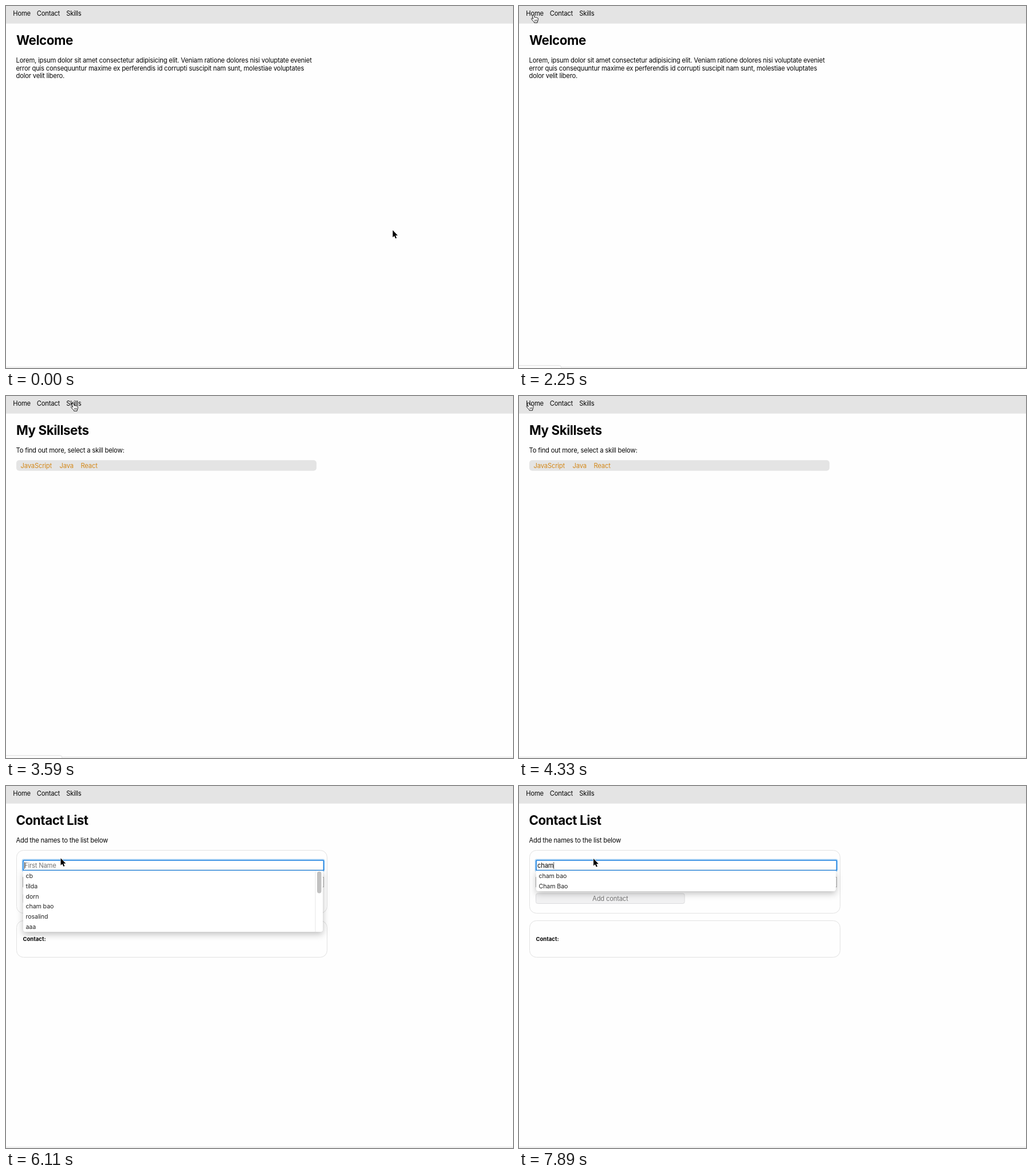
Write an HTML page that moves like this. It is 885 px wide and 633 px high and loops after 8000 ms.

```html
<!DOCTYPE html>
<html lang="en">
<head>
<meta charset="utf-8">
<title>Contact list demo</title>
<style>
  html, body { margin: 0; width: 100%; height: 100%; overflow: hidden; background: #fefefe; }
  svg { display: block; width: 885px; height: 633px; }
  text { font: 11.2px Inter, "Liberation Sans", sans-serif; letter-spacing: -.175px; fill: #050505; white-space: pre; }
  .title { font-size: 22.3px; font-weight: 700; letter-spacing: -.42px; }
  .label { font-size: 9.5px; font-weight: 700; letter-spacing: 0; }
  .hint { fill: #757575; }
  .skill { fill: #d3881a; }
  .row { font-size: 10.6px; letter-spacing: -.08px; fill: #222; }
  .card { fill: none; stroke: #e2e2e2; }
  .drop { fill: #fff; filter: drop-shadow(0 4px 6px rgba(0, 0, 0, .25)); }
</style>
</head>
<body>
<svg viewBox="0 0 885 633">
  <rect width="885" height="633" fill="#fefefe"/>
  <rect width="885" height="30.7" fill="#e4e4e4"/>
  <text x="12.3" y="17">Home</text>
  <text x="53.7" y="17">Contact</text>
  <text x="105.2" y="17">Skills</text>

  <g id="home">
    <text class="title" x="18" y="67.7">Welcome</text>
    <text x="17.5" y="98.8">Lorem, ipsum dolor sit amet consectetur adipisicing elit. Veniam ratione dolores nisi voluptate eveniet</text>
    <text x="17.5" y="112.6">error quis consequuntur maxime ex perferendis id corrupti suscipit nam sunt, molestiae voluptates</text>
    <text x="17.5" y="126.4">dolor velit libero.</text>
  </g>

  <g id="contact">
    <text class="title" x="17.5" y="67.7">Contact List</text>
    <text x="17.5" y="98.8">Add the names to the list below</text>
    <rect class="card" x="18.5" y="112.5" width="542" height="110" rx="12"/>
    <rect class="card" x="18.5" y="235.5" width="542" height="64" rx="12"/>
    <rect x="29.5" y="159.5" width="525" height="17" fill="#fff" stroke="#b2b2b2"/>
    <text class="hint" x="32" y="172">Last Name</text>
    <rect x="29.5" y="188" width="259.5" height="17.5" rx="3" fill="#f1f1f2" stroke="#dcdcde"/>
    <text class="hint" x="159.3" y="201" text-anchor="middle">Add contact</text>
    <text class="label" x="29.5" y="271">Contact:</text>
    <rect x="28.5" y="128.5" width="527" height="20.5" rx="2" fill="none" stroke="#b9dcf8" stroke-width="2"/>
    <rect x="30" y="130" width="524.5" height="17.5" rx="1" fill="#fff" stroke="#187fe0" stroke-width="1.7"/>
    <text id="field" x="32" y="143"></text>
    <path id="caret" d="M0 133V145" stroke="#333" stroke-width=".8"/>
    <g id="drop">
      <path id="panel" class="drop"/>
      <g id="rows"></g>
      <g id="scroll">
        <path d="M540 148V255" stroke="#e6e6e6"/>
        <rect x="543" y="149.5" width="7.5" height="38" rx="3.7" fill="#c1c1c1"/>
      </g>
    </g>
  </g>

  <g id="skills">
    <text class="title" x="18" y="67.7">My Skillsets</text>
    <text x="17.5" y="98.8">To find out more, select a skill below:</text>
    <rect x="18" y="112.3" width="524" height="18.5" rx="5" fill="#e4e4e4"/>
    <text class="skill" x="25.6" y="126">JavaScript</text>
    <text class="skill" x="93.5" y="126">Java</text>
    <text class="skill" x="130.5" y="126">React</text>
  </g>

  <path d="M0 631.5H885" stroke="#dcdcdc"/>
  <path id="status" fill="#fbfbfb" stroke="#e0e0e0"/>

  <path id="arrow" d="M0 0V12.6L2.8 10L4.9 14.6L6.9 13.7L4.9 9.2H8.8Z" fill="#000" stroke="#fff" stroke-width="1.2" paint-order="stroke"/>
  <g id="hand" stroke="#111" stroke-linejoin="round" stroke-linecap="round">
    <path d="M3 1.2C3.8.3 5 .6 5.3 1.8L6.3 5.2C7 4.4 8 4.6 8.4 5.3C9.2 4.7 10 5 10.4 5.8C11.4 5.3 12.2 5.9 12.3 7C12.5 9 12.3 10.5 11.3 12L11 14.2H5.6L5.2 12.8C3.5 11 1.7 9.5.6 7.6C.3 6.4 1.6 5.8 2.6 6.8L3.7 7.8L2.4 2.7C2.2 2 2.5 1.5 3 1.2Z" fill="#fff"/>
    <path d="M6.4 9.3L6.8 11.7M8.2 9.1L8.6 11.5M9.9 8.9L10.2 11.2" fill="none" stroke-width=".7"/>
  </g>
</svg>
<script>
const LOOP = 8000;
const $ = id => document.getElementById(id);

// Each track lists [start time, value...]; a value holds until the next entry.
const pages = [[0, 'home'], [2990, 'contact'], [3590, 'skills'], [4620, 'home'], [5220, 'contact']];
const status = [[0, 0], [2250, 74], [2690, 111], [3290, 98], [3740, 0], [4920, 111], [5520, 0]];
const typed = [[0, ''], [6700, 'c'], [7300, 'co'], [7450, 'c'], [7600, 'ch'], [7750, 'cha'], [7890, 'cham']];
const all = ['cb', 'tilda', 'dorn', 'cham bao', 'rosalind', 'aaa'];
const pair = ['cham bao', 'Cham Bao'];
const onC = ['cb', ...pair, 'CB'];
const lists = [[0, []], [5960, all], [6850, onC], [7300, []], [7450, onC], [7600, pair]];
const pointer = [
  [0, 675, 392, 'arrow'], [1200, 640, 352, 'arrow'], [1350, 500, 232, 'arrow'],
  [1500, 300, 112, 'arrow'], [1650, 140, 48, 'arrow'], [1800, 56, 22, 'arrow'],
  [1950, 22, 11, 'hand'], [2100, 20, 13, 'hand'], [2250, 21, 15, 'hand'],
  [2390, 34, 14, 'hand'], [2540, 60, 13, 'hand'], [2690, 76, 12.5, 'hand'],
  [2990, 77, 12, 'hand'], [3140, 100, 12, 'hand'], [3290, 113, 12, 'hand'],
  [4030, 90, 12, 'hand'], [4180, 42, 11.5, 'hand'], [4330, 12.5, 11, 'hand'],
  [4620, 14, 11, 'hand'], [4770, 45, 12, 'hand'], [4920, 74, 12.5, 'hand'],
  [5370, 76, 14, 'hand'], [5520, 82, 52, 'arrow'], [5670, 88, 98, 'arrow'],
  [5820, 91, 124, 'arrow'], [5960, 92, 127, 'arrow'], [6110, 95.5, 126.2, 'arrow'],
  [6250, 130, 127, 'arrow']
];

const at = (track, t) => track.findLast(step => step[0] <= t).slice(1);
const show = (id, on) => { $(id).style.display = on ? '' : 'none'; };

function drawList(names) {
  const bottom = 148 + (names === all ? 107 : names.length * 18);
  show('drop', names.length);
  show('scroll', names === all);
  $('panel').setAttribute('d', `M30 148H553V${bottom - 4}q0 4 -4 4H34q-4 0 -4 -4Z`);
  $('rows').innerHTML = names.map((name, i) =>
    `<text class="row" x="34.5" y="${161.2 + i * 17.75}">${name}</text>`).join('');
}

function drawField(value) {
  const field = $('field');
  field.textContent = value || 'First Name';
  field.setAttribute('class', value ? '' : 'hint');
  const x = value ? 32.3 + field.getComputedTextLength() : 32.5;
  $('caret').setAttribute('transform', `translate(${x} 0)`);
}

function drawStatus(width) {
  show('status', width);
  $('status').setAttribute('d', `M-2 628.5H${width - 3.5}Q${width - .5} 628.5 ${width - .5} 631.5V636H-2Z`);
}

let last = '';
function frame(now) {
  const t = now % LOOP;
  const [page] = at(pages, t), [width] = at(status, t), [value] = at(typed, t), [names] = at(lists, t);
  const [x, y, shape] = at(pointer, t);
  const key = [page, width, value, names, x, y].join('|');
  if (key !== last) {
    last = key;
    for (const id of ['home', 'contact', 'skills']) show(id, id === page);
    drawStatus(width);
    drawField(value);
    drawList(names);
    for (const id of ['arrow', 'hand']) show(id, id === shape);
    $(shape).setAttribute('transform', `translate(${x} ${y})`);
  }
  requestAnimationFrame(frame);
}
frame(performance.now());
</script>
</body>
</html>
```
